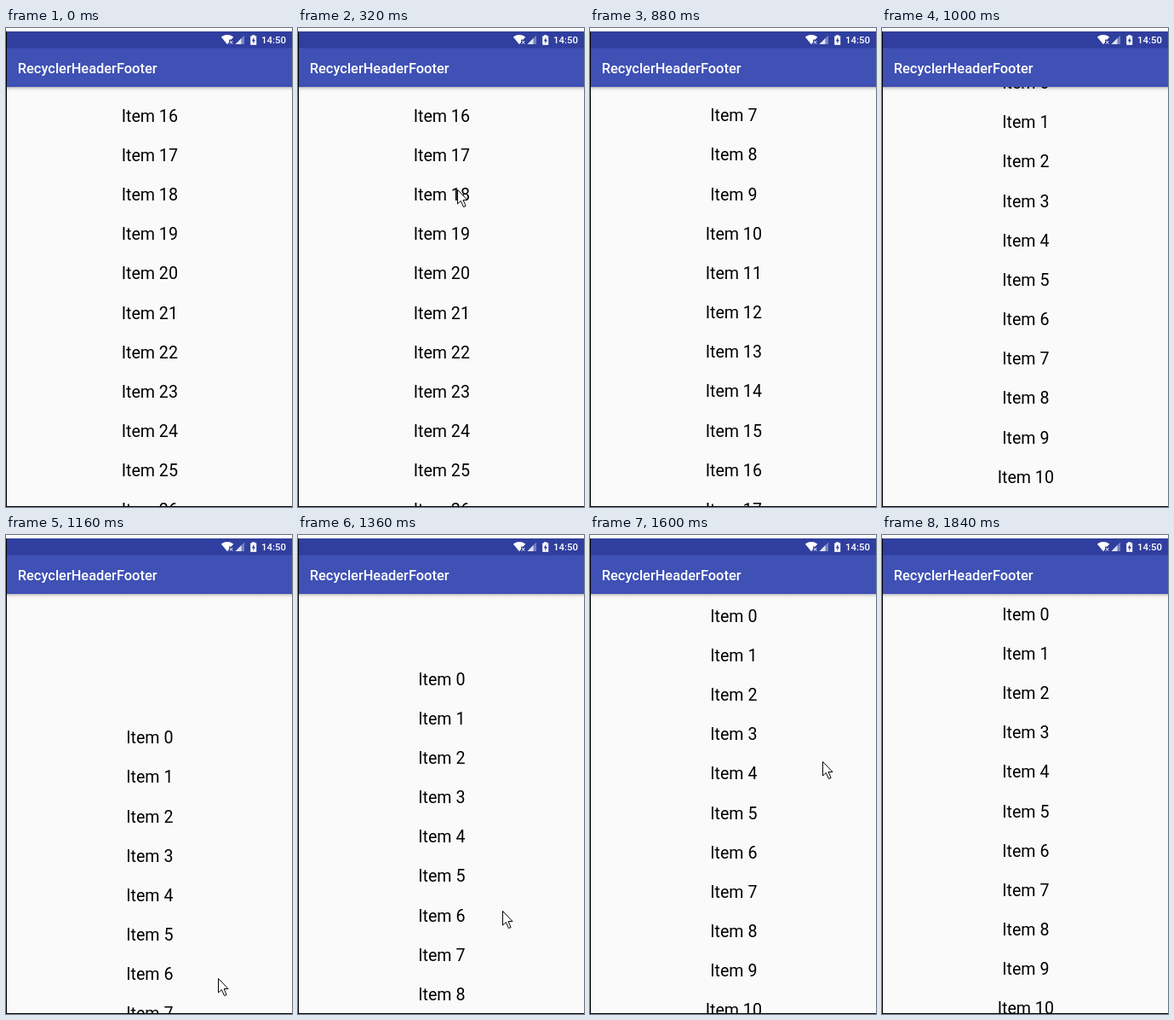
Recreate the animation shown at these times as an HTML page with a canvas. Size 336x561 px, loop 1.88 s.

```html
<!DOCTYPE html>
<html lang="en">
<head>
<meta charset="utf-8">
<title>RecyclerHeaderFooter</title>
<style>
html, body { margin: 0; width: 100%; height: 100%; overflow: hidden; background: #fff; }
canvas { display: block; width: 336px; height: 561px; }
</style>
</head>
<body>
<canvas id="stage"></canvas>
<script>
const W = 336, H = 561, LOOP = 1880, STEP = 40;
const PITCH = 46.17, BAR_TOP = 23.6, BAR_END = 69;
const REST = 93, PULLED = 237.5, SCROLLED = 103 - 16 * PITCH;
const FLING = 680, SNAP = 1160, MOVE = 480;
const canvas = document.getElementById('stage');
const ctx = canvas.getContext('2d');
const dpr = window.devicePixelRatio || 1;
canvas.width = Math.round(W * dpr);
canvas.height = Math.round(H * dpr);

// Pointer path as Bezier legs, each running until the next one starts
const legs = [
  { from: 40, to: 520, x: [282, 210, 143, 211], y: [92, 230, 205, 126] },
  { from: 680, to: 880, x: [211, 215, 225, 235], y: [126, 150, 340, 566] },
  { from: 880, to: 1360, x: [235, 253, 253, 240], y: [566, 610, 483, 440] },
  { from: 1360, to: 1840, x: [240, 231, 304, 339], y: [440, 439, 85, 107] }
];

const clamp = u => Math.min(1, Math.max(0, u));
const mix = (a, b, u) => a + (b - a) * u;

function ease(u) {
  const v = clamp(u) ** .83;
  return v * v * (3 - 2 * v);
}

function bezier([a, b, c, d], u) {
  const v = 1 - u;
  return a * v ** 3 + 3 * b * u * v * v + 3 * c * u * u * v + d * u ** 3;
}

// Centre of item 0: a fling past the header, then a snap back
function listTop(t) {
  return t < SNAP
    ? mix(SCROLLED, PULLED, ease((t - FLING) / MOVE))
    : mix(PULLED, REST, ease((t - SNAP) / MOVE));
}

function rect(color, x, y, w, h) {
  ctx.fillStyle = color;
  ctx.fillRect(x, y, w, h);
}

function poly(points, color) {
  ctx.beginPath();
  points.forEach(([x, y]) => ctx.lineTo(x, y));
  ctx.closePath();
  ctx.fillStyle = color;
  ctx.fill();
}

function text(str, x, y, font, color, align) {
  ctx.font = font + ' Roboto, sans-serif';
  ctx.fillStyle = color;
  ctx.textAlign = align;
  ctx.fillText(str, x, y);
}

function drawList(first) {
  ctx.save();
  ctx.beginPath();
  ctx.rect(1, BAR_END, W - 1, H - BAR_END - 1);
  ctx.clip();
  for (let i = 0; i < 30; i++) {
    const y = Math.round(first + i * PITCH + 6.75);
    text('Item ' + i, 168.8, y, '400 19.6px', '#000', 'center');
  }
  ctx.restore();
}

function drawIcons() {
  // wifi without a connection
  ctx.beginPath();
  ctx.moveTo(260, 19.3);
  ctx.lineTo(252.8, 10.4);
  ctx.quadraticCurveTo(260, 5.6, 267.2, 10.4);
  ctx.closePath();
  ctx.fillStyle = '#fff';
  ctx.fill();
  rect('#303f9f', 262, 13.6, 6, 6);
  ctx.strokeStyle = '#fff';
  ctx.lineWidth = 1;
  ctx.beginPath();
  ctx.moveTo(263, 15);
  ctx.lineTo(266.2, 18.6);
  ctx.moveTo(266.2, 15);
  ctx.lineTo(263, 18.6);
  ctx.stroke();
  // mobile signal
  poly([[269.5, 19], [280, 19], [280, 8.5]], '#7681c0');
  poly([[269.5, 19], [276.5, 19], [276.5, 12]], '#dfe2f1');
  // battery
  rect('#fff', 289, 8.3, 3.4, 1.6);
  rect('#fff', 287.2, 9.4, 7, 10.4);
  poly([[291.4, 10.8], [288.7, 15.2], [290.3, 15.2], [290.3, 18.4],
    [292.8, 14], [291.4, 14]], '#303f9f');
}

function drawBars() {
  rect('#3f51b5', 1, 4, W - 1, BAR_END - 4);
  rect('#303f9f', 1, 4, W - 1, BAR_TOP - 4);
  const shade = ctx.createLinearGradient(0, BAR_END, 0, BAR_END + 5);
  shade.addColorStop(0, 'rgba(0,0,0,.27)');
  shade.addColorStop(.4, 'rgba(0,0,0,.09)');
  shade.addColorStop(1, 'rgba(0,0,0,0)');
  rect(shade, 1, BAR_END, W - 1, 5);
  drawIcons();
  text('14:50', 300, 18, '500 11.4px', '#fff', 'left');
  text('RecyclerHeaderFooter', 13.8, 53, '500 16.42px', '#fff', 'left');
}

function drawPointer(t) {
  const leg = legs.findLast(l => t >= l.from);
  if (!leg || t >= 1840) return;
  const u = clamp((t - leg.from) / (leg.to - leg.from));
  ctx.save();
  ctx.translate(Math.round(bezier(leg.x, u)) + .5, Math.round(bezier(leg.y, u)) + .5);
  poly([[0, 0], [0, 16.5], [3.8, 13], [7, 20], [9.6, 19], [6.6, 12], [11.5, 12]], '#fff');
  ctx.strokeStyle = '#000';
  ctx.lineWidth = 1;
  ctx.stroke();
  ctx.restore();
}

function draw(t) {
  ctx.setTransform(dpr, 0, 0, dpr, 0, 0);
  rect('#fff', 0, 0, W, 4);
  rect('#fafafa', 0, 4, W, H - 4);
  drawList(listTop(t));
  drawBars();
  rect('#000', 0, 4, 1, H - 4);
  drawPointer(t);
  rect('#000', 0, H - 1, W, 1);
}

const start = performance.now();
function tick() {
  const t = (performance.now() - start) % LOOP;
  draw(Math.floor(t / STEP) * STEP);
  requestAnimationFrame(tick);
}
tick();
</script>
</body>
</html>
```
